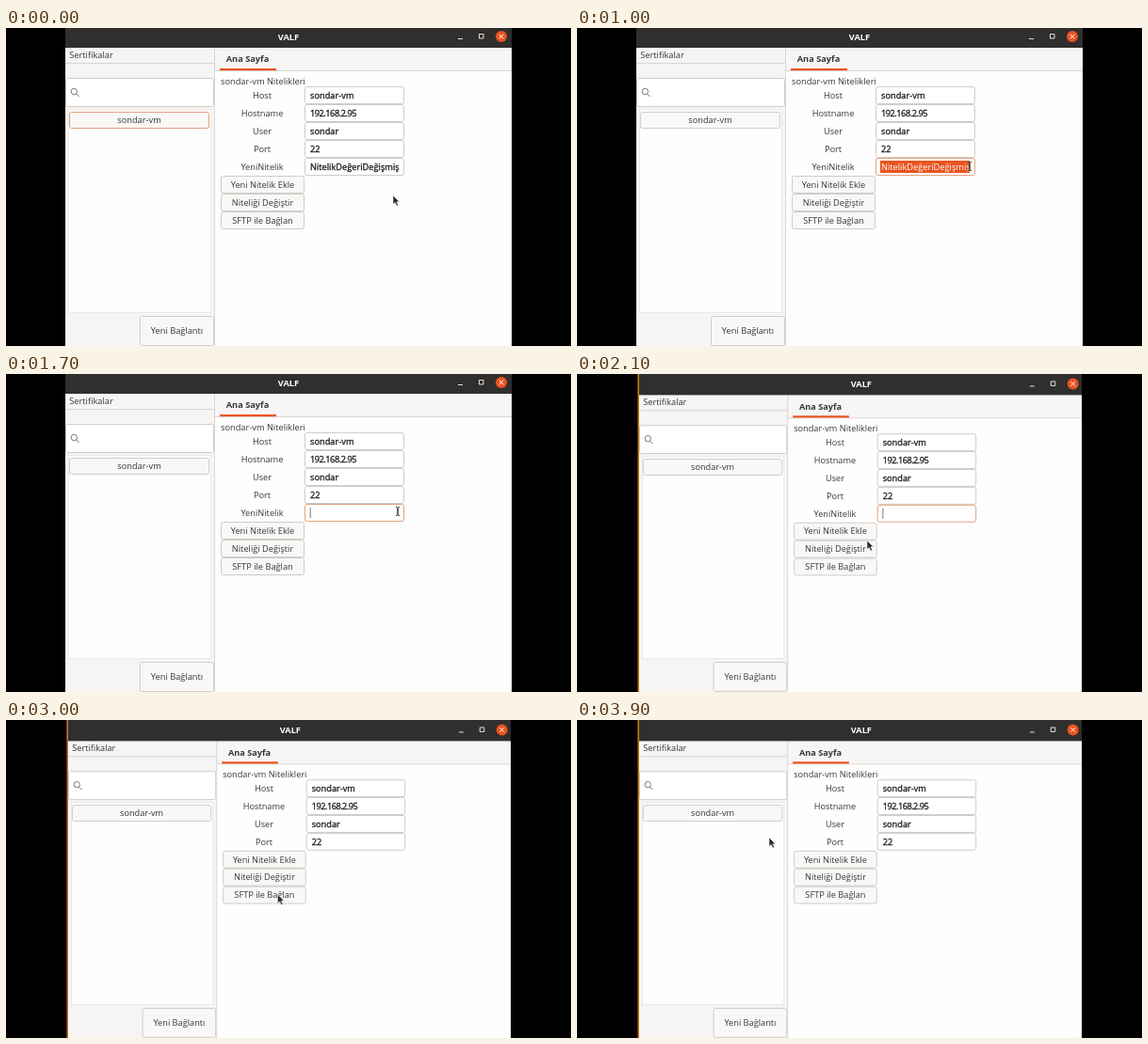
These frames come from a looping animation (600 px wide and 338 px high, 4000 ms). An HTML page:

```html
<!DOCTYPE html>
<html lang="tr">
<head>
<meta charset="utf-8">
<style>
html, body { margin: 0; width: 100%; height: 100%; overflow: hidden; background: #000; }
svg { display: block; width: 600px; height: 338px; font: 9.25px "Open Sans", "Noto Sans", sans-serif; }
text { fill: #35383a; white-space: pre; }
.mid { text-anchor: middle; }
.bold { font-weight: 700; }
.value { fill: #1c1c1c; stroke: #1c1c1c; stroke-width: .3; }
.selected { fill: #fff; stroke: none; }
.line { fill: none; stroke: #d9d6d3; }
.box { fill: #fff; stroke: #d0ccc8; }
.btn { fill: #f9f8f7; stroke: #d0ccc8; }
.focus { stroke: #e0a27c; }
.pressed { fill: #dfdcd9; stroke: #e0764a; }
</style>
</head>
<body>
<svg viewBox="0 0 600 338"></svg>
<script>
const svg = document.querySelector('svg');
const rect = (x, y, w, h, attrs = '', r = 0) =>
  `<rect x="${x}" y="${y}" width="${w}" height="${h}" rx="${r}" ${attrs}/>`;
const text = (x, y, s, cls = '', attrs = '') =>
  `<text x="${x}" y="${y}" class="${cls}" ${attrs}>${s}</text>`;
const button = (x, y, w, h, label, id = '') =>
  rect(x + .5, y + .5, w - 1, h - 1, `class="btn" id="${id}"`, 2) +
  text(x + w / 2, y + h / 2 + 3.3, label, 'mid');
const entry = (y, id = '') => rect(317.5, y + .5, 105, 18, `class="box" id="${id}"`, 2);
const field = (i, label, value, attrs) =>
  text(272, 75 + 19 * i, label, 'mid') + entry(62 + 19 * i) +
  text(323, 75 + 19 * i, value, 'value', attrs);

const titleBar = rect(60, -4, 480, 25, 'fill="#302f2d"') +
  `<text x="300" y="13" class="mid bold" style="fill:#fff">VALF</text>
  <path d="M480 11.5h5M502.5 6.5h4.5v4.5h-4.5z" fill="none" stroke="#e4e2df"/>
  <circle cx="526" cy="9" r="6" fill="#e95420"/>
  <path d="M523.7 6.7l4.6 4.6m0-4.6l-4.6 4.6" stroke="#fff"/>`;

const sidebar = rect(63, 21, 158, 325, 'fill="#f6f5f4"') +
  text(67.3, 32, 'Sertifikalar') +
  '<path class="line" d="M63 37.5h158"/>' +
  rect(63.5, 53.5, 157, 30, 'class="box"', 2) +
  `<g fill="none" stroke="#777"><circle cx="72.3" cy="67.5" r="3.2"/>
  <path d="M74.6 70l3 3"/></g>` +
  rect(66.5, 86.5, 151, 216, 'fill="#fefefe" stroke="#ebe9e7"') +
  button(67, 89, 149, 18, 'sondar-vm', 'host') +
  button(142, 306, 79, 32, 'Yeni Bağlantı');

const page = rect(221, 21, 316, 325, 'fill="#fefefe"') +
  rect(221, 21, 316, 24, 'fill="#f7f6f5"') +
  '<path class="line" d="M221.5 21v325M221 45.5h316"/>' +
  rect(227, 43, 60, 2.2, 'fill="#e95420"') +
  text(256.5, 36.3, 'Ana Sayfa', 'mid bold') +
  text(228, 60.3, 'sondar-vm Nitelikleri') +
  field(0, 'Host', 'sondar-vm') +
  field(1, 'Hostname', '192.168.2.95', 'letter-spacing="-.5"') +
  field(2, 'User', 'sondar') +
  field(3, 'Port', '22') +
  '<g id="extra">' + text(272, 151, 'YeniNitelik', 'mid') + entry(138, 'edit') +
  rect(322, 141, 95, 13, 'id="mark" fill="#e95420"') +
  text(323, 151, 'NitelikDeğeriDeğişmiş', 'value', 'id="value" clip-path="url(#clip)"') +
  '<path id="caret" d="M323.2 142v11" stroke="#777"/></g>' +
  '<g id="buttons">' +
  ['Yeni Nitelik Ekle', 'Niteliği Değiştir', 'SFTP ile Bağlan']
    .map((s, i) => button(228, 157 + 19 * i, 89, 19, s, 'b' + i)).join('') + '</g>';

svg.innerHTML = `<clipPath id="clip"><path d="M318 138h99.5v19H318z"/></clipPath>
  <g id="win">${rect(63, 0, 474, 346, 'fill="#fff"')}${sidebar}${page}${titleBar}</g>
  ${rect(64.3, 0, 1.6, 338, 'id="edge" fill="#d9801c"')}
  <path id="arrow" d="M0 0v9.4l2.2-2 1.7 3.6 1.7-.8-1.7-3.5h2.9z" fill="#2c2c2c" stroke="#fff" stroke-width=".5"/>
  <path id="beam" d="M-2-4.5q2 0 2 1v7q0 1-2 1M2-4.5q-2 0-2 1v7q0 1 2 1" fill="none" stroke="#333"/>
  ${rect(0, 0, 63, 338, 'id="left"')}${rect(537, 0, 63, 338, 'id="right"')}`;

const $ = id => document.getElementById(id);
const show = (id, on) => $(id).style.display = on ? '' : 'none';
const moves = [[0, 411, 178], [100, 411, 178], [600, 417, 147], [1300, 417, 147], [1600, 416, 146],
  [1800, 416, 146], [2100, 308, 177], [2400, 288.5, 185.5], [3400, 288.5, 185.5], [3900, 204, 125], [4000, 204, 125]];

function pointer(t) {
  const i = moves.findIndex(m => m[0] > t);
  const [t0, x0, y0] = moves[i - 1], [t1, x1, y1] = moves[i];
  const k = (t - t0) / (t1 - t0), e = k * k * (3 - 2 * k);
  return [x0 + (x1 - x0) * e, y0 + (y1 - y0) * e];
}

function draw(t) {
  const zoomed = t >= 1800, removed = t >= 2900, selected = t >= 800 && t < 1400;
  $('win').setAttribute('transform', zoomed ? 'translate(3.3 1.5) scale(.995)' : '');
  $('left').setAttribute('width', zoomed ? 64.3 : 63);
  $('right').setAttribute('x', zoomed ? 536 : 537);
  show('edge', zoomed);
  $('host').classList.toggle('focus', t < 700);
  $('edit').classList.toggle('focus', t >= 700);
  show('mark', selected);
  show('value', t < 1400);
  $('value').classList.toggle('selected', selected);
  show('caret', t >= 1400 && t < 2500);
  show('extra', !removed);
  $('buttons').setAttribute('transform', removed ? 'translate(0 -19)' : '');
  $('b1').classList.toggle('pressed', t >= 2800 && !removed);

  const [x, y] = pointer(t);
  const inField = !removed && x > 318 && x < 423 && y < 157;
  show('beam', inField);
  show('arrow', !inField);
  $(inField ? 'beam' : 'arrow').setAttribute('transform', `translate(${x} ${y})`);
}

const start = performance.now();
function tick() {
  draw(Math.floor((performance.now() - start) % 4000 / 100) * 100);
  requestAnimationFrame(tick);
}
tick();
</script>
</body>
</html>
```
